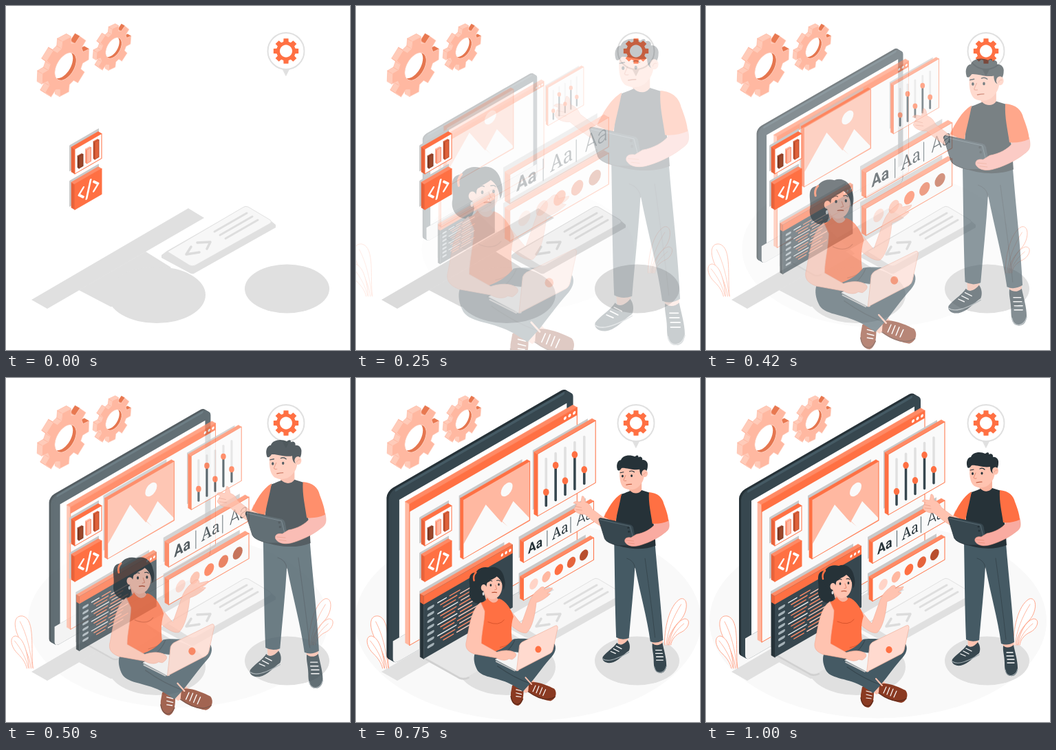
Animation, 500 px wide and 500 px high, one loop 1040 ms. Source, as an HTML page with a canvas:

```html
<!DOCTYPE html>
<html lang="en">
<head>
<meta charset="utf-8">
<title>Web design team</title>
<style>
html, body { margin: 0; width: 100%; height: 100%; overflow: hidden; background: #fff; }
canvas { display: block; width: 500px; height: 500px; }
</style>
</head>
<body>
<canvas id="stage" width="500" height="500"></canvas>
<script>
const stage = document.getElementById('stage').getContext('2d');
const buffer = document.createElement('canvas');
buffer.width = buffer.height = 500;
const layer = buffer.getContext('2d');
let ctx = stage;

const LOOP = 1040, K = 0.577;
const ORANGE = '#ff7043', SALMON = '#ffb8a1', SKIN = '#ffc3b0', INK = '#263238',
  SLATE = '#37474f', BLUE = '#455a64', BROWN = '#9c472b', SHOE = '#8a3a22',
  GREY = '#e0e0e0', SHADE = '#c9c9c9', PAPER = '#fafafa';

// ---- drawing helpers ----
function paint(path, fill, line, width = 1) {
  if (fill) { ctx.fillStyle = fill; ctx.fill(path, 'evenodd'); }
  if (line) {
    ctx.strokeStyle = line;
    ctx.lineWidth = width;
    ctx.lineJoin = ctx.lineCap = 'round';
    ctx.stroke(path);
  }
}
const shape = (d, fill, line, width) => paint(new Path2D(d), fill, line, width);
const trace = (d, color, width) => shape(d, null, color, width);

function oval(x, y, rx, ry, fill, line, width) {
  const p = new Path2D();
  p.ellipse(x, y, rx, ry, 0, 0, 7);
  paint(p, fill, line, width);
}

// Runs a drawing inside the slanted wall plane whose corner is x, y.
function plane(x, y, draw, sx = 1) {
  ctx.save();
  ctx.transform(sx, -K * sx, 0, 1, x, y);
  draw();
  ctx.restore();
}

function face(x, y, w, h, fill, line, width = 1, r = 0) {
  plane(x, y, () => {
    const p = new Path2D();
    p.roundRect(0, 0, w, h, r);
    paint(p, fill, line, width);
  });
}

function slab(x, y, w, h, d, left, top, front, line) {
  const e = K * d, r = K * w;
  shape(`M${x} ${y}l${-d} ${-e}v${h}l${d} ${e}Z`, left, left, .6);
  shape(`M${x} ${y}l${w} ${-r}l${-d} ${-e}l${-w} ${r}Z`, top, top, .6);
  face(x, y, w, h, front, line);
}

function gearPoints(R, root, phase) {
  const pts = [], step = Math.PI / 4;
  for (let i = 0; i < 8; i++) {
    const a = phase + i * step;
    for (const [r, o] of [[root, -.27], [R, -.19], [R, .19], [root, .27]])
      pts.push([r * Math.cos(a + o), r * Math.sin(a + o)]);
  }
  return pts;
}

function ring(p, r, map) {
  for (let i = 0; i < 40; i++) {
    const a = i * Math.PI / 20;
    p[i ? 'lineTo' : 'moveTo'](...map([r * Math.cos(a), r * Math.sin(a)]));
  }
  p.closePath();
  return p;
}

function gearPath(pts, hole, map) {
  const p = new Path2D();
  pts.forEach((q, i) => p[i ? 'lineTo' : 'moveTo'](...map(q)));
  p.closePath();
  return ring(p, hole, map);
}

function isoGear(x, y, R, hole, phase, d) {
  const map = ([u, v]) => [x + .866 * u, y + v - .5 * u];
  const pts = gearPoints(R, R * .76, phase), e = d * K;
  // inner wall of the hole
  const rim = ring(new Path2D(), hole, map);
  ctx.save();
  ctx.clip(rim);
  ctx.fillStyle = '#e5764f';
  ctx.fillRect(x - R, y - R, 2 * R, 2 * R);
  ctx.translate(-d * .7, -e * .7);
  ctx.fillStyle = '#fff';
  ctx.fill(rim);
  ctx.restore();
  pts.forEach((a, i) => {
    const b = pts[(i + 1) % pts.length], [ax, ay] = map(a), [bx, by] = map(b);
    if ((by - ay) * d + (ax - bx) * e > 0) return;
    const lit = a[0] + b[0] < R * .8;
    shape(`M${ax} ${ay}L${bx} ${by}l${-d} ${-e}L${ax - d} ${ay - e}Z`, lit ? '#ffcbb9' : '#e87850', lit ? '#ffab91' : '#e87850', .5);
  });
  paint(gearPath(pts, hole, map), SALMON, '#ffd3c5', .6);
}

// ---- still parts ----
function floorShadows(g) {
  shape('M37 427L265 294L288 308L60 440Z', g(224));
  shape('M106 413L203 357L240 380L175 436L152 437Z', g(224));
  oval(219, 420, 71, 41, g(224));
  oval(408.5, 411, 61.5, 35.5, g(224));
}

function codePad(g) {
  shape('M226 362L234 356L348 291L386 313L392 318V322L273 389Q270 390 267 388L226 366Z', g(224));
  shape('M235 357L344 293Q348 290 352 292L384 311Q387 314 384 316L275 377Q271 379 267 377Z', g(247), g(226), 1);
  for (const [x, y] of [[303, 328], [311, 333], [319, 338]])
    trace(`M${x} ${y}l47 -27`, g(222), 3);
  trace('M269 350L262 361L281 358M278 344L297 343L292 353', g(220), 3.5);
}

function pin() {
  shape('M402 91H412L407 101Z', GREY, GREY, 1);
  oval(407, 65.5, 26.5, 26.5, '#fff', GREY, 2);
  paint(gearPath(gearPoints(18.5, 14, 0), 9, ([u, v]) => [407 + u, 65.5 + v]), ORANGE);
}

function icons() {
  face(92, 202.5, 43, 38, SHADE, null, 1, 1);
  slab(100, 208, 39, 36, 5, '#e8623a', ORANGE, '#fff', ORANGE);
  const bars = [[104, 219, 17, BROWN, '#7d3620'], [115.5, 209, 20, SALMON, '#ff9273'], [127, 198, 25, '#e0623b', '#b84c2b']];
  for (const [x, y, h, front, side] of bars) slab(x + 2, y, 6, h, 2, side, front, front, side);
  face(92, 254, 43, 38, SHADE, null, 1, 1);
  slab(100, 259, 39, 37, 5, '#e8623a', '#ff8a65', ORANGE, ORANGE);
  plane(100, 259, () => trace('M12.5 12L6 19L12.5 26M27.5 12L34 19L27.5 26M23 7L17 31', '#fff', 3));
}

// ---- screen parts ----
function monitor() {
  shape('M104 402L152 429Q158 431 164 428L225 392L180 350Z', '#e7e7e7');
  trace('M104 404L152 431Q158 433 164 430', '#d0d0d0', 2.5);
  for (let i = 8; i > 0; i--) face(56 - i, 171 - i * K, 256, 241, i > 5 ? INK : SLATE, null, 1, 9);
  face(56, 171, 256, 241, SLATE, null, 1, 9);
  plane(52, 171, () => trace('M10 -1H246', BLUE, 4));
  plane(56, 171, () => {
    shape('M10 13H247V208H10Z', '#fff');
    shape('M1 208H255V232Q255 241 246 241H10Q1 241 1 232Z', '#f2f2f2');
  });
}

function browser() {
  slab(81, 184, 237, 200, 6, SALMON, '#ff8a65', PAPER, ORANGE);
  face(81, 184, 237, 11, ORANGE);
  plane(81, 184, () => { for (let i = 0; i < 3; i++) oval(220 + i * 6.5, 5.5, 2, 2.2, '#fff'); });
}

function picture() {
  face(148, 171, 92, 80, SHADE);
  slab(154, 177, 97, 86, 4, ORANGE, ORANGE, SALMON, ORANGE);
  shape('M155 241L187 184L210 210L227 179L250 203V206L155 262Z', PAPER);
  shape('M202 201L219 216L210 207Z', SALMON);
  plane(217.5, 162, () => oval(0, 0, 8.5, 9, PAPER));
}

function sliders() {
  face(258, 106, 78, 84, SHADE);
  slab(265, 111, 82, 88, 5, ORANGE, '#ff8a65', PAPER, ORANGE);
  [165, 127, 149, 112, 133].forEach((knob, i) => {
    const x = 277 + i * 13.5, dy = i * 7.8;
    trace(`M${x} ${118 - dy}V${knob}`, GREY, 3.5);
    trace(`M${x} ${knob}V${184 - dy}`, SLATE, 3.5);
    oval(x, knob, 4.2, 5, ORANGE);
  });
}

function fonts() {
  face(235, 231, 100, 32, SHADE);
  slab(242, 238.5, 105, 31, 5, ORANGE, '#ff8a65', PAPER, ORANGE);
  const faces = ['600 20.5px Roboto, sans-serif', '500 22px "Noto Serif", serif', '300 24px Roboto, sans-serif'];
  plane(242, 238.5, () => {
    ctx.fillStyle = INK;
    faces.forEach((font, i) => {
      ctx.font = font;
      ctx.fillText('Aa', [8, 49.5, 92][i], 22.5);
    });
    trace('M41 4V27M81.5 4V27', SLATE, 1);
  }, .866);
}

function palette() {
  face(235, 284, 100, 32, SHADE);
  slab(242, 291.5, 105, 33, 5, ORANGE, '#ff8a65', PAPER, ORANGE);
  ['#ffd4c7', SALMON, ORANGE, '#e5643c', '#b84f2f'].forEach((c, i) =>
    plane(257.5 + i * 18.7, 300 - i * 10.8, () => oval(0, 0, 6.4, 7.4, c)));
}

function editor() {
  face(94, 310, 120, 82, SHADE);
  slab(100, 317, 126, 89, 5, INK, '#ff8a65', SLATE);
  shape('M95 314L100 317V329L95 326Z', '#e8623a');
  face(100, 317, 126, 12, ORANGE);
  plane(100, 317, () => {
    for (let i = 0; i < 3; i++) oval(111 + i * 5.6, 6, 1.7, 2, '#fff');
    for (let i = 0; i < 7; i++) trace(`M7 ${22 + i * 9}h6`, '#a4b1b7', 4);
    for (let i = 0; i < 12; i++) {
      const y = 21 + i * 5.2, a = 20 + (i * 7 % 3) * 4, w = 12 + (i * 11 % 17);
      trace(`M${a} ${y}h${w}`, i % 3 ? '#ff8a65' : '#eceff1', 1.6);
      trace(`M${a + w + 5} ${y}h${14 + (i * 13 % 19)}`, i % 2 ? '#ffccbc' : '#ff8a65', 1.6);
    }
  });
}

function plants() {
  const pink = '#ffa78d';
  shape('M46 422C42 395 50 351 31 346C16 344 17 365 29 384C38 398 41 410 43 422', '#fff', pink, 1);
  shape('M40 422C38 400 33 378 21 375C11 375 13 391 24 401C31 408 35 414 37 422', '#fff', pink, 1);
  trace('M27 354C37 373 42 395 45 421M19 382C29 394 36 408 39 421', pink, .8);
  shape('M447 388C446 368 453 330 470 321C482 318 481 340 470 352C460 362 452 374 451 388', '#fff', pink, 1);
  shape('M453 388C455 373 464 353 476 350C486 350 482 364 472 369C463 373 457 380 456 388', '#fff', pink, 1);
  trace('M471 329C459 348 452 366 449 388M475 357C464 366 457 376 454 388', pink, .8);
}

// ---- people ----
function man() {
  shape('M380 376L396 376L395 392L381 390ZM430 380H447L447 394L433 394Z', SKIN);
  shape('M379 388C384 394 391 389 395 384C399 389 399 396 397 400C389 405 381 416 370 418C361 419 356 414 358 409C363 402 374 396 379 388Z', SLATE);
  trace('M358 412C366 418 382 411 397 402', '#9aa5aa', 1.2);
  trace('M378 393l8 4M374 397l8 4M370 401l7 3', '#fff', 1.3);
  shape('M432 389C437 393 443 392 447 388C449 398 453 411 453 421C453 430 448 434 442 433C435 432 434 423 434 414C434 404 431 397 432 389Z', SLATE);
  trace('M435 424C437 436 450 435 453 423', '#9aa5aa', 1.2);
  trace('M437 399h9M437 404h10M438 409h10M438 414h10', '#fff', 1.3);
  shape('M375 238L436 240C440 290 446 340 448 384Q438 390 429 386C424 350 414 315 406 274C404 310 400 345 397 381Q387 385 378 380C376 330 376 290 375 238Z', BLUE);
  trace('M406 276C405 268 400 264 394 262M421 262C426 300 432 340 436 380', SLATE, 1);
  // pointing arm
  shape('M363 193L377 205C371 211 363 217 357 215C348 210 339 203 331 196C323 197 315 192 315 188L319 181L314 179C316 176 320 177 325 178L327 169C331 168 331 175 332 178C338 180 340 184 342 188L359 201Z', SKIN, '#f3a893', .6);
  trace('M317 184L326 186M318 189L327 190', '#e99a84', .7);
  shape('M396 148L416 143V163C411 168 402 168 398 163Z', '#f9b29d');
  shape('M386 166C392 164 396 162 399 161C404 166 412 166 416 160L429 164C430 175 429 190 432 203C436 215 436 232 437 243C420 250 395 249 376 241C377 225 378 200 379 185Z', INK);
  shape('M386 165C374 172 365 188 360 200L377 208C379 195 383 182 386 165Z', ORANGE);
  // head
  shape('M384 124C382 138 383 152 390 157C398 161 408 160 414 152C420 146 421 135 420 124L400 114Z', SKIN);
  shape('M380 130C377 121 381 115 385 115C387 108 398 106 406 110C409 107 412 108 411 111C414 109 418 111 417 115C422 114 426 119 425 124C425 130 422 134 418 139C414 138 413 133 413 129C404 131 392 126 386 127C384 130 382 132 380 130Z', INK);
  oval(420.5, 135, 4.5, 5.5, SKIN);
  trace('M419 137q1 -4 4 -3', '#e99a84', .8);
  oval(387.5, 139, 1.5, 2, INK);
  oval(401, 138.5, 1.5, 2, INK);
  trace('M384 134l5 -1M398 132q4 -2 7 1', INK, 1.2);
  trace('M392 138l-3 7q1 2 4 1', '#e58a72', 1);
  trace('M393 152q5 -1 8 -1', '#b5482d', 1.1);
  // slate held in the hand
  shape('M352 204Q352 201 356 202L399 211Q403 212 404 216L407 232L402 243L381 243Q364 239 361 233Z', SLATE, INK, .8);
  trace('M354 204L399 214L404 234', '#60737c', .8);
  oval(396, 216, 1.4, 1.6, INK);
  oval(397, 222, 1.4, 1.6, INK);
  shape('M434 206L456 204C458 214 458 219 450 224C439 233 423 240 411 243C402 245 394 243 391 237C390 232 394 230 400 231L408 226C420 224 430 218 435 212Z', '#f9aba1', '#ee9a88', .6);
  trace('M393 235l11 1M396 239l9 1', '#e58a72', .7);
  shape('M427 163C440 164 447 171 449 180C453 190 456 200 456 206Q445 211 432 210C430 195 426 180 427 163Z', ORANGE);
}

function girl() {
  shape('M172 280C157 282 166 299 163 309C162 320 170 328 181 327C187 323 188 312 186 298Z', INK);
  // far arm
  shape('M212 326C224 333 232 348 241 357L252 326C255 317 260 310 267 305C272 299 277 302 275 306L287 303C287 306 283 309 279 311L284 312C278 318 270 323 263 325C261 345 257 362 249 370C239 373 226 359 214 351Z', SKIN, '#f3a893', .6);
  shape('M184 308L201 314L207 321C203 328 193 327 188 321Z', '#f9b29d');
  shape('M181 325C186 324 188 321 190 318C196 328 204 327 207 319C218 322 226 336 229 346C224 360 226 378 228 388C212 402 188 404 172 400C174 385 180 360 176 340Z', ORANGE);
  trace('M191 354q16 7 24 -3M209 392q14 -3 17 -10', '#d8542c', 1);
  // head
  shape('M184 288C181 304 186 317 196 320C206 320 213 311 212 297L208 284Z', SKIN);
  shape('M171 287C171 276 182 270 193 273C203 269 213 276 215 288C217 294 217 301 214 306C213 297 210 290 204 286C198 291 191 292 189 297C189 302 186 307 182 309C173 305 168 296 171 287Z', INK);
  trace('M173 280C169 284 169 288 170 292', ORANGE, 2.5);
  oval(184.5, 303, 4, 5, SKIN);
  oval(184, 312, 1.5, 2.5, '#d8d8d8');
  oval(195, 299, 1.4, 2, INK);
  oval(207, 298, 1.4, 2, INK);
  trace('M191 294q4 -3 6 -1M204 292q4 -1 5 1', INK, 1.1);
  trace('M202 299l2 6l-3 1', '#e58a72', 1);
  trace('M197 310q4 -1 7 0', '#b5482d', 1.2);
  // legs and shoes
  shape('M237 453L250 432L265 448L248 460Z', SKIN);
  shape('M227 449C236 443 243 450 244 457C244 468 242 477 236 479C228 479 224 470 225 460Z', SHOE);
  trace('M225 465C227 479 238 481 243 469', '#5d2a1a', 1.3);
  trace('M233 455l8 2M233 460l8 2M233 465l7 1', '#fff', 1.2);
  shape('M252 445C262 441 280 449 290 454C295 460 292 470 284 472C274 471 256 463 251 457Z', SHOE);
  trace('M251 458C262 466 278 474 291 466', '#5d2a1a', 1.3);
  trace('M262 449l-4 9M267 450l-4 10M272 452l-4 10M277 455l-4 9', '#fff', 1.2);
  shape('M171 402C185 404 215 398 228 380C240 377 268 381 287 383C294 389 293 398 286 406C275 418 264 434 254 446L243 458L229 449C207 436 183 438 175 426C170 417 169 408 171 402Z', BLUE);
  trace('M205 420C222 432 236 440 254 446M231 381C225 395 214 404 200 410', SLATE, 1.2);
  trace('M247 437L256 447', SKIN, 2);
  // near arm and laptop
  shape('M202 410L222 398L246 401L236 427Q232 427 230 425Z', '#f5f5f5', '#d9d9d9', .8);
  trace('M203 413L231 427', '#c9c9c9', 1.6);
  shape('M180 325C164 335 162 370 158 386C157 395 163 399 171 402L204 408C211 412 218 412 222 409L227 410C232 407 235 403 231 400C224 395 213 396 204 399L181 386C181 372 186 352 186 338Z', SKIN, '#f3a893', .6);
  shape('M238 389Q239 386 242 384L291 360Q295 358 295 363L288 395Q287 399 284 401L234 427Z', '#ffdacf', '#f2b6a4', .8);
  oval(266, 395, 4.6, 5, ORANGE);
}

// ---- motion ----
function ease(x) {
  const bez = (u, a, b) => 3 * (1 - u) ** 2 * u * a + 3 * (1 - u) * u * u * b + u ** 3;
  let lo = 0, hi = 1;
  for (let i = 0; i < 30; i++) {
    const mid = (lo + hi) / 2;
    if (bez(mid, .36, .5) < x) lo = mid; else hi = mid;
  }
  return bez(lo, -.01, 1.38);
}

function reveal(p, draw, from, cx, cy) {
  const alpha = Math.min(1, p);
  if (alpha <= .004) return;
  layer.setTransform(1, 0, 0, 1, 0, 0);
  layer.clearRect(0, 0, 500, 500);
  if (from) {
    const s = from + (1 - from) * p;
    layer.setTransform(s, 0, 0, s, cx * (1 - s), cy * (1 - s));
  } else {
    layer.translate(-30 * (1 - p), 0);
  }
  ctx = layer;
  draw();
  ctx = stage;
  stage.globalAlpha = alpha;
  stage.drawImage(buffer, 0, 0);
  stage.globalAlpha = 1;
}

const IN = .5, OUT = 1.5;

function render(t) {
  // 24 steps per second, held on a 10 ms clock
  let k = 24;
  while (Math.round(k * 100 / 24) * 10 > t) k--;
  const p = ease(Math.min(1, (k + .45) / 24));
  const dim = 1 - .07 * Math.max(0, 1 - Math.abs(k - 4) / 3);
  const grey = v => { const c = Math.round(v * dim); return `rgb(${c},${c},${c})`; };

  stage.fillStyle = '#fff';
  stage.fillRect(0, 0, 500, 500);
  reveal(p, () => oval(250, 353, 245, 141.5, '#f9f9f9'), IN, 250, 353);
  floorShadows(grey);
  codePad(grey);
  reveal(p, plants);
  reveal(p, monitor, IN, 180, 226);
  reveal(p, browser, IN, 196.5, 215);
  reveal(p, picture);
  icons();
  reveal(p, sliders, IN, 303.5, 131);
  reveal(p, fonts, OUT, 292, 221);
  reveal(p, palette, OUT, 292, 277);
  reveal(p, editor, IN, 160.5, 322);
  isoGear(86.5, 88, 40, 18, .05, 7);
  isoGear(156.5, 61, 29.4, 13.5, .1, 5);
  pin();
  reveal(p, man, OUT, 385.5, 271);
  reveal(p, girl, OUT, 226, 375.5);
}

const start = performance.now();
function tick() {
  render((performance.now() - start) % LOOP);
  requestAnimationFrame(tick);
}
tick();
</script>
</body>
</html>
```
